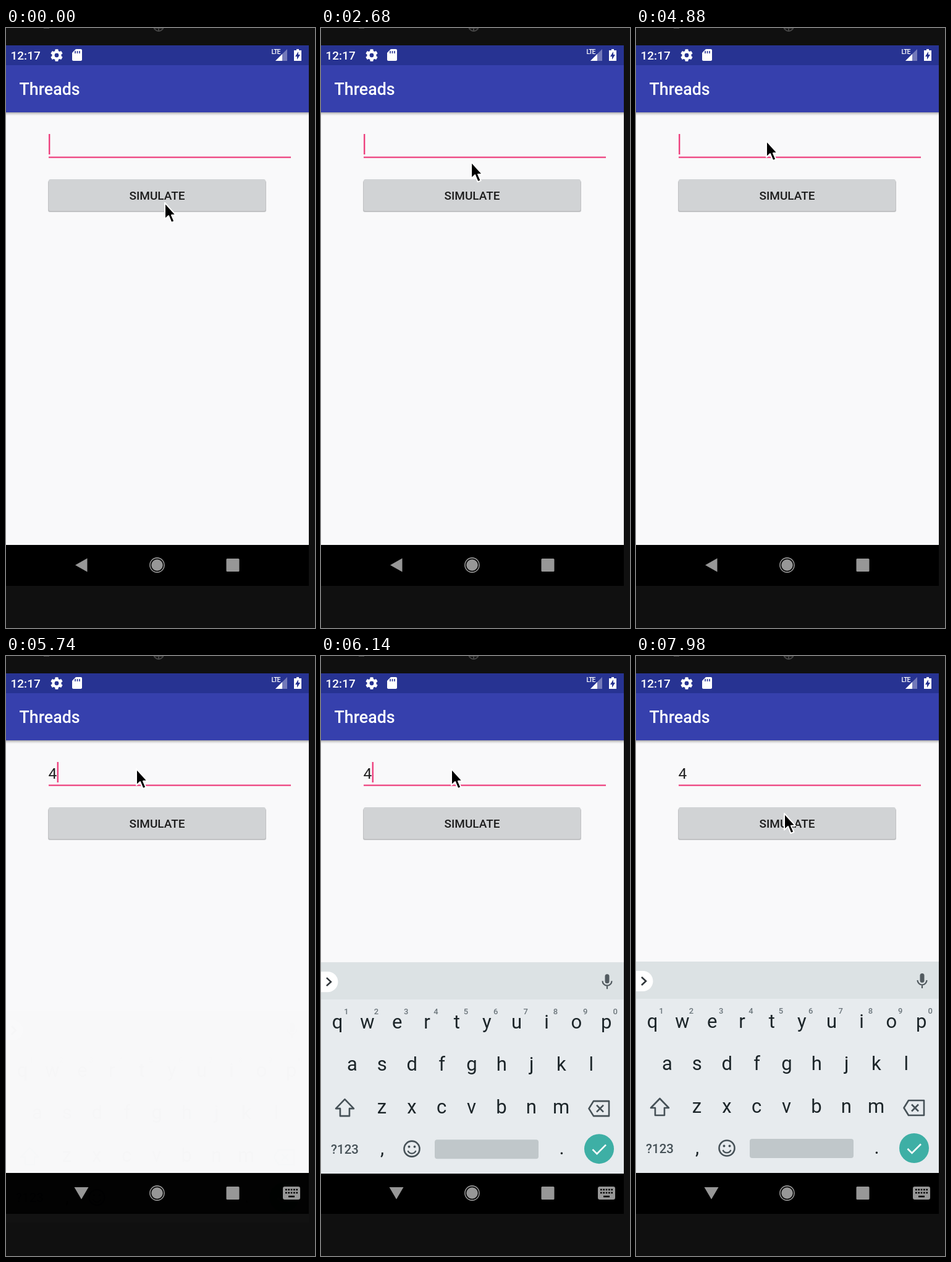
Recreate the animation shown at these times as an HTML page. Size 500x968 px, loop 8000 ms.

```html
<!DOCTYPE html>
<html lang="en">
<head>
<meta charset="utf-8">
<title>Threads</title>
<style>
  html, body { margin: 0; width: 100%; height: 100%; overflow: hidden; background: #101010; }
  svg { display: block; width: 100%; height: 100%; }
  text { font-family: Roboto, sans-serif; }
  .medium { font-weight: 500; }
  .key { font-size: 31px; fill: #1c2529; text-anchor: middle; }
  .hint { font-size: 13px; font-weight: 500; fill: #6b757b; text-anchor: middle; }
  .outline { fill: none; stroke: #465157; stroke-width: 2.6; stroke-linejoin: round; }
</style>
</head>
<body>
<svg viewBox="0 0 500 968">
  <defs>
    <linearGradient id="shadow" x2="0" y2="1">
      <stop stop-color="#707070" stop-opacity=".6"/>
      <stop offset="1" stop-color="#d0d0d0" stop-opacity="0"/>
    </linearGradient>
  </defs>
  <rect width="500" height="968" fill="#101010"/>
  <g fill="none" stroke="#454545" stroke-width="2">
    <path d="M61 0H70"/>
    <circle cx="247" cy="-3" r="8"/>
    <path d="M240 0H254M247 0V5"/>
  </g>

  <!-- App screen -->
  <rect y="136" width="490" height="698" fill="#f9f9fa"/>
  <rect y="136" width="490" height="6" fill="url(#shadow)"/>
  <rect y="60" width="490" height="76" fill="#3640ad"/>
  <rect y="28" width="490" height="32" fill="#273392"/>
  <text class="medium" x="21.5" y="108" font-size="26.8" fill="#fff">Threads</text>

  <!-- Status bar -->
  <g fill="#fff">
    <text class="medium" x="7.5" y="50.5" font-size="19">12:17</text>
    <g id="gear" transform="translate(82 44)"></g>
    <path d="M113 34H121Q123 34 123 36V51Q123 53 121 53H109Q107 53 107 51V40Z"/>
    <path d="M112 37V41M115.5 37V41M119 37V41" stroke="#273392" stroke-width="1.6"/>
    <text class="medium" x="429.5" y="42" font-size="10.5" letter-spacing="-1">LTE</text>
    <path d="M455 34V53H436Z" fill="#7379b9"/>
    <path d="M447 42V53H436Z"/>
    <path d="M470 34H474V36H478V53H466V36H470Z"/>
    <path d="M473 38V43H476L471 51V46H468Z" fill="#273392"/>
  </g>

  <!-- Input and button -->
  <path d="M69 208.6H461" stroke="#ee417e" stroke-width="2.4"/>
  <text id="typed" x="68.5" y="198" font-size="24.5" fill="#212121">4</text>
  <rect id="caret" y="171" width="2.4" height="33" fill="#ee417e"/>
  <rect x="68" y="246" width="353" height="51" rx="3" fill="#a4a5a8" opacity=".65"/>
  <rect x="69" y="244" width="351" height="51" rx="3" fill="#d1d3d5"/>
  <text class="medium" x="244.5" y="277" font-size="19" text-anchor="middle" fill="#1c1c1c">SIMULATE</text>

  <rect y="834" width="490" height="66" fill="#000"/>

  <!-- Keyboard -->
  <g id="keyboard">
    <rect y="493" width="490" height="341" fill="#e7ebee"/>
    <rect y="493" width="490" height="60" fill="#dce2e4"/>
    <path d="M0 508H11A16.5 16.5 0 0 1 11 541H0Z" fill="#fff"/>
    <path d="M9 518L16 524.5L9 531" fill="none" stroke="#30363a" stroke-width="2.6"/>
    <rect x="459.5" y="512" width="7" height="15" rx="3.5" fill="#525b60"/>
    <path d="M455.5 523A7.5 7.5 0 0 0 470.5 523M463 530.5V536" fill="none" stroke="#525b60" stroke-width="2.2"/>
    <g id="keys"></g>
    <path class="outline" d="M38.5 714L24 729H31V741H46V729H53Z"/>
    <path class="outline" d="M441 717H466V741H441L433.5 729ZM446 723.5L457 734.5M457 723.5L446 734.5"/>
    <text class="medium" x="38.5" y="802" font-size="20.5" text-anchor="middle" fill="#465157">?123</text>
    <circle class="outline" cx="147" cy="794" r="12.5"/>
    <circle cx="142.5" cy="790.5" r="1.9" fill="#465157"/>
    <circle cx="151.5" cy="790.5" r="1.9" fill="#465157"/>
    <path d="M140.5 797A7 7 0 0 0 153.5 797" fill="none" stroke="#465157" stroke-width="2.2"/>
    <rect x="184" y="779" width="168" height="31" rx="4" fill="#c0c7ca"/>
    <circle cx="450" cy="794" r="24" fill="#3eafa5"/>
    <path d="M439.5 795L446.5 802L461 787.5" fill="none" stroke="#fff" stroke-width="2.6"/>
  </g>

  <!-- Navigation icons -->
  <g fill="#979797">
    <path id="back" d="M112 866.5L131.5 855.5V877.5Z"/>
    <path id="hide" d="M110.5 857H133.5L122 876.5Z"/>
    <circle cx="244.5" cy="866.5" r="9.3"/>
    <circle cx="244.5" cy="866.5" r="11.6" fill="none" stroke="#979797" stroke-width="1.6"/>
    <rect x="356.5" y="856" width="21" height="21" rx="1.5"/>
    <g id="switcher">
      <rect x="448" y="856" width="28" height="21" rx="3"/>
      <path d="M452 861H472M452 866H472" stroke="#000" stroke-width="2.6" stroke-dasharray="2.6 1.75"/>
      <path d="M457 872H467" stroke="#000" stroke-width="2.6"/>
    </g>
  </g>

  <path id="pointer" d="M1 1V27.5L7 22L11.5 33L16.5 31L12 20.8H19Z"
        fill="#000" stroke="#fff" stroke-width="2" stroke-linejoin="round"/>
</svg>
<script>
  // The screen plays 2.8 times slower than real time, so a 500 ms blink lasts 1400 ms.
  const LOOP = 8000, SLOW = 2.8, BLINK = 500 * SLOW, BLINK_AT = 1480;
  const TYPE_AT = 5460, NAV_AT = 5660, SLIDE_AT = 5740, SLIDE = 250 * SLOW, FADE = 150 * SLOW;
  const $ = id => document.getElementById(id);
  const show = (id, on) => $(id).setAttribute('visibility', on ? 'visible' : 'hidden');
  const place = (id, x, y) => $(id).setAttribute('transform', `translate(${x} ${y})`);
  const progress = (t, from, length) => Math.max(0, Math.min(1, (t - from) / length));
  const smooth = p => p * p * (3 - 2 * p);

  const label = (kind, x, y, s) => `<text class="${kind}" x="${x}" y="${y}">${s}</text>`;
  const row = (chars, x, y, kind = 'key') =>
    [...chars].map((c, i) => label(kind, x + 48.35 * i, y, c)).join('');
  $('keys').innerHTML =
    row('qwertyuiop', 26.5, 599.5) + row('1234567890', 41, 577, 'hint') +
    row('asdfghjkl', 50.5, 668) + row('zxcvbnm', 98.5, 737) +
    label('key', 99, 803, ',') + label('key', 389.5, 803, '.');

  const teeth = Array.from({ length: 6 }, (_, i) =>
    `<rect x="-2.6" y="-9.8" width="5.2" height="6" rx="1" transform="rotate(${i * 60})"/>`).join('');
  $('gear').innerHTML = teeth + '<circle r="5.5" fill="none" stroke="#fff" stroke-width="4.2"/>';

  // The pointer drifts, curves up to the input, then comes down to the button.
  function pointerAt(t) {
    const drift = progress(t, 0, 1560);
    const up = smooth(progress(t, 1560, 1860));
    const down = smooth(progress(t, 6900, 1080));
    return [256 - 46 * up ** 2.8 + 29 * down, 281 - 2 * drift - 98 * up + 72 * down];
  }

  function draw(t) {
    const typed = t >= TYPE_AT;
    const blinkTime = typed ? t - TYPE_AT : t - BLINK_AT + 2 * BLINK;
    show('typed', typed);
    show('caret', blinkTime % (2 * BLINK) < BLINK);
    $('caret').setAttribute('x', typed ? 82.6 : 69);

    const imeOpen = t >= NAV_AT;
    show('back', !imeOpen);
    show('hide', imeOpen);
    show('switcher', imeOpen);

    show('keyboard', t > SLIDE_AT);
    place('keyboard', 0, 80 * (1 - progress(t, SLIDE_AT, SLIDE)) ** 5);
    $('keyboard').setAttribute('opacity', 1 - (1 - progress(t, SLIDE_AT, FADE)) ** 3);

    place('pointer', ...pointerAt(t));
  }

  const start = performance.now();
  function tick() {
    draw((performance.now() - start) % LOOP);
    requestAnimationFrame(tick);
  }
  tick();
</script>
</body>
</html>
```
